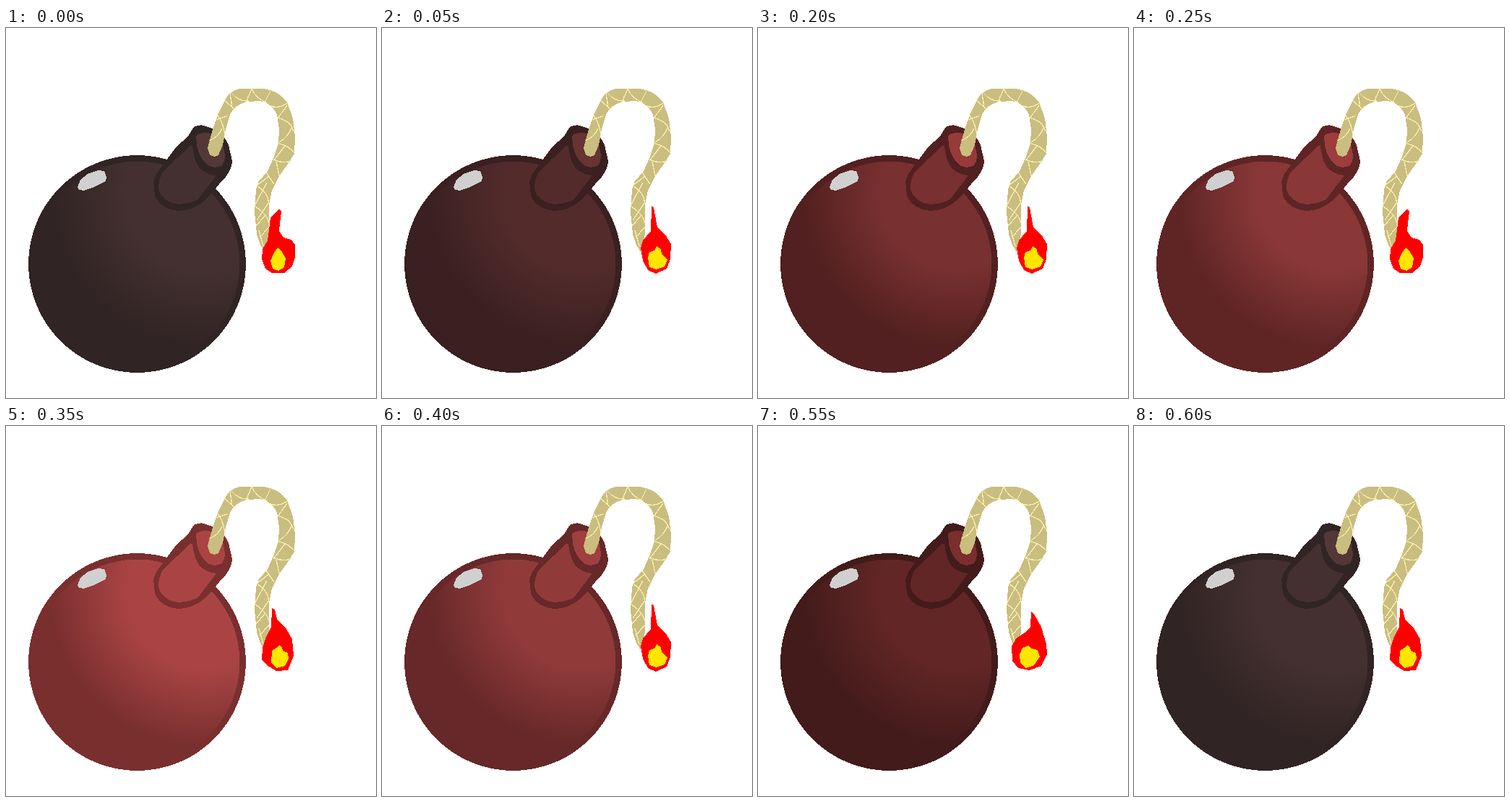
These frames come from a looping animation (512x512 px, 650 ms). An HTML page:

```html
<!DOCTYPE html>
<html lang="en">
<head>
<meta charset="utf-8">
<title>Bomb</title>
<style>
html, body { margin: 0; width: 100%; height: 100%; overflow: hidden; background: #fff; }
svg { display: block; width: 100vw; height: 100vh; shape-rendering: crispEdges; }
.dark { fill: var(--dark); }
.main { fill: var(--main); }
.mouth { fill: var(--mouth); }
.glow { stop-color: var(--main); }
.shade { stop-color: var(--dark); }
.rope { fill: #cabd80; }
.net { fill: none; stroke: #fbf0ad; stroke-width: 1.3; }
</style>
</head>
<body>
<svg viewBox="0 0 512 512">
  <defs>
    <radialGradient id="ball" gradientUnits="userSpaceOnUse" cx="275" cy="228" r="214">
      <stop class="glow" offset=".5"/>
      <stop class="shade" offset="1"/>
    </radialGradient>
  </defs>

  <circle class="dark" cx="181.5" cy="326.5" r="150.5"/>
  <circle fill="url(#ball)" cx="181.5" cy="326.5" r="142"/>
  <path fill="#d0d0d0" d="M99 220L103 210L113 202L127 197L136 198L139 206L138 212L122 220L108 225L101 224Z"/>

  <path class="dark" d="M204 212L208 202L221 184L236 164L252 150L259 138Q266 133 274 135L288 140Q304 150 308 162L313 184Q313 194 304 206L295 216L282 232Q262 253 238 253Q214 250 206 232Z"/>
  <path class="main" d="M255 163H258Q260 185 269 195Q279 203 291 204L266 237Q250 246 232 243Q214 237 211 222Q211 207 218 198Z"/>
  <path class="mouth" d="M263 149Q270 143 284 146L299 155L303 175Q303 187 297 191Q288 195 279 190Q268 181 264 163Z"/>

  <path class="rope" d="M279 166L286 140L294 118L304 98Q309 88 323 84L357 84Q379 88 389 103L397 125L400 150L399 174L390 188L378 205L368 225L364 245V285L358 310L352 300L347 285L344 255L346 223L350 212L362 198L370 180L377 160L378 140L375 120Q367 103 350 101L335 102Q317 105 310 120L304 140L300 162L294 176L288 178L282 176Z"/>
  <path class="net" d="M293 121Q301 132 303 148M281 156Q294 151 299 139M290 127L306 122M302 100L316 112M310 90L313 110M312 90Q322 102 336 101M340 84L332 103M340 84Q346 98 362 104M366 87L358 103M389 104Q378 112 366 108M389 107L376 125M378 125Q394 129 398 143M378 158Q390 152 396 136M378 160Q390 162 399 173M386 163L370 184M370 182Q382 188 394 184M374 185L378 204M360 200L371 216M347 218L364 205M348 219Q362 227 364 243M361 214L345 244M345 247Q360 256 364 270M364 241L347 266M346 274L358 260M350 280L356 302M351 290L364 275"/>

  <path id="flame" fill="#f00"/>
  <path id="core" fill="#ffe600"/>
</svg>
<script>
const STEP = 50;

// Per heat level: main, dark and mouth colour, each as [red, green and blue]
const palette = [
  [[68, 48], [49, 36], [84, 56]],
  [[98, 38], [67, 27], [122, 46]],
  [[120, 48], [82, 32], [150, 58]],
  [[170, 68], [122, 47], [170, 68]]
];
const heat = [0, .5, 1, 1.5, 2, 2.33, 2.67, 3, 2.5, 2, 1.5, 1, 0];

// Outer flame and its core
const flames = {
  hook: ["M378 250L381 254L379 270L378 281L384 290L395 293L400 300V318L396 330L385 339H368L359 333L354 320L355 306L362 294L364 280L366 262Z",
    "M376 304L381 308L387 319L385 331L377 336L369 333L366 322L371 311Z"],
  spike: ["M373 247L376 248L381 276L392 286L400 299L399 320L394 333L379 340L368 335L361 322L358 305L361 294L372 281Z",
    "M380 302L386 306L387 313L395 321L391 330L380 334L370 331L368 318L370 310L377 308Z"],
  lean: ["M388 249L393 262L396 282L398 305V325L391 336L376 340L358 337L353 326L354 306L371 283L386 267ZM379 244h4v3h-4zM384 250h2v2h-2zM380 253h2v2h-2z",
    "M378 299L385 304L388 310L391 325L390 333L372 335L364 330L359 320L370 308Z"],
  drop: ["M368 252L372 254L375 267L388 281L396 295L398 318L390 338L374 339L361 331L354 324L355 307L360 292L367 278Z",
    "M378 303L382 307L383 311L390 314L391 322L386 332L374 335L367 327L368 311L374 307Z"],
  curl: ["M378 257L383 262L392 278L399 302L400 316L392 332L376 338L360 335L352 325L351 305L357 294L369 286L377 278Z",
    "M374 304L379 308L387 310L390 319L382 331L371 335L363 328L362 316L366 307Z"]
};
const order = "hook curl spike drop lean hook curl drop lean spike hook curl drop".split(" ");
// The upright spike and the leaning flame alternate with the rounder ones
order[2] = order[9] = "lean";
order[1] = order[4] = order[8] = "spike";
order[2 - 0] = "lean";

const root = document.documentElement;
const flame = document.getElementById("flame");
const core = document.getElementById("core");
let shown = -1;

function paint(i) {
  const low = Math.min(Math.floor(heat[i]), palette.length - 2);
  const mix = heat[i] - low;
  ["main", "dark", "mouth"].forEach((name, n) => {
    const [r, g] = palette[low][n].map((v, c) => Math.round(v + (palette[low + 1][n][c] - v) * mix));
    root.style.setProperty("--" + name, `rgb(${r},${g},${g})`);
  });
  const [outer, inner] = flames[order[i]];
  flame.setAttribute("d", outer);
  core.setAttribute("d", inner);
}

const start = performance.now();
function tick() {
  const i = Math.floor((performance.now() - start) / STEP) % heat.length;
  if (i !== shown) paint(shown = i);
  requestAnimationFrame(tick);
}
tick();
</script>
</body>
</html>
```
